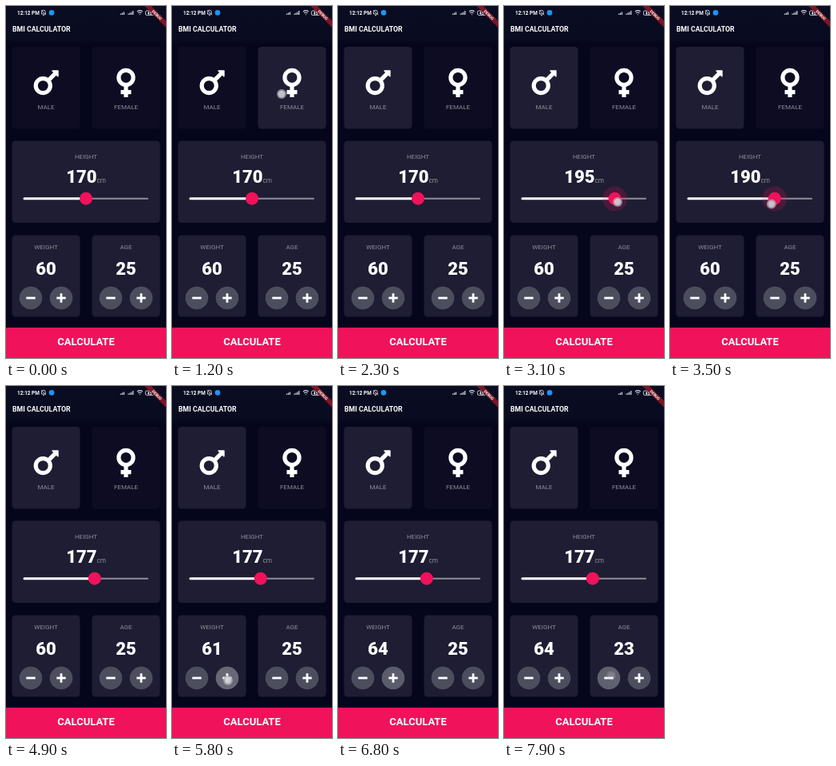
Animation, 200 px wide and 440 px high, one loop 8000 ms. Source, as an HTML page:

```html
<!DOCTYPE html>
<html lang="en">
<head>
<meta charset="utf-8">
<title>BMI Calculator</title>
<style>
html, body { margin: 0; width: 200px; height: 440px; overflow: hidden; background: #05061c; }
svg { display: block; font-family: Roboto, "Liberation Sans", sans-serif; }
.card { fill: #1e1d33; }
.label { font-size: 8px; fill: #8d8e98; text-anchor: middle; }
.num { font-size: 22px; font-weight: 900; fill: #fff; text-anchor: middle; }
.unit { font-size: 8.2px; font-weight: 400; fill: #8d8e98; }
.bold { font-weight: 700; fill: #fff; }
</style>
</head>
<body>
<svg width="200" height="440" viewBox="0 0 200 440">
  <defs>
    <linearGradient id="bar" x2="0" y2="1">
      <stop offset="0" stop-color="#0a0d22"/>
      <stop offset=".85" stop-color="#090b20"/>
      <stop offset="1" stop-color="#05061c"/>
    </linearGradient>
    <g id="button">
      <circle r="14.3" fill="#4c4e5e"/>
      <path d="M-5.7 0H5.7" stroke="#fff" stroke-width="2.8"/>
    </g>
  </defs>
  <rect width="200" height="48" fill="url(#bar)"/>

  <!-- status bar -->
  <text class="bold" x="14" y="10.8" font-size="6.4">12:12 PM</text>
  <g fill="none" stroke="#d5d6de" stroke-width=".9">
    <path d="M44.5 10V7.6a2.4 2.4 0 0 1 4.8 0V10ZM46 11.6h2M44 5.2l6 6"/>
    <path d="M164 7q3.3-2.6 6.6 0M165.2 8.8q2.1-1.6 4.2 0" stroke-width="1.2"/>
    <rect x="174.4" y="6" width="10.4" height="5.4" rx="1.4"/>
  </g>
  <circle cx="57" cy="8.4" r="3.3" fill="#1c96f3"/>
  <path d="M143 11v-1.5h1.2V11zm1.9 0V8.6h1.2V11zm1.9 0V7.4H148V11zM152.500 11v-1.500h1.200V11zm1.900 0V8.600h1.200V11zm1.900 0V7.400h1.200V11zm1.900 0V6h1.200v5zM166.400 10.300h1.800l-.9 1.200z" fill="#d5d6de"/>
  <text class="bold" x="179.600" y="10.500" font-size="4.800" text-anchor="middle">45</text>
  <g transform="translate(200) rotate(45)">
    <rect x="-22" y="13" width="44" height="6" fill="#7d1524"/>
    <text class="bold" y="17.700" font-size="4.800" text-anchor="middle">DEBUG</text>
  </g>
  <text class="bold" x="8" y="32" font-size="8.750">BMI CALCULATOR</text>

  <!-- gender -->
  <rect id="male" class="card" x="7.500" y="51" width="85" height="102.500" rx="4.400"/>
  <rect id="female" class="card" x="107.500" y="51" width="85" height="102.500" rx="4.400"/>
  <g transform="translate(34.600 75) scale(.081)" fill="none" stroke="#fff" stroke-width="64">
    <circle cx="144" cy="304" r="112"/>
    <path d="M225 223L335 113"/>
    <path d="M290 74H374V158Z" fill="#fff" stroke-width="20" stroke-linejoin="round"/>
  </g>
  <g transform="translate(138.300 75.200) scale(.081)" fill="none" stroke="#fff" stroke-width="64">
    <circle cx="144" cy="176" r="112"/>
    <path d="M144 300V480M64 400H224"/>
  </g>
  <text class="label" x="50" y="128.900">MALE</text>
  <text class="label" x="150" y="128.900">FEMALE</text>

  <!-- height -->
  <rect class="card" x="7.500" y="168.500" width="185" height="102.500" rx="4.400"/>
  <text class="label" x="100" y="190.900">HEIGHT</text>
  <text class="num" x="100" y="221"><tspan id="height">170</tspan><tspan class="unit">cm</tspan></text>
  <path d="M23 240.700H177" stroke="#8d8e98" stroke-width="2" stroke-linecap="round"/>
  <path id="track" stroke="#fff" stroke-width="3" stroke-linecap="round"/>
  <circle id="halo" cy="240.700" fill="#eb1555" opacity=".2"/>
  <circle id="knob" cy="240.700" r="8" fill="#f0125a"/>

  <!-- weight and age -->
  <rect class="card" x="7.500" y="286.500" width="85" height="102" rx="4.400"/>
  <rect class="card" x="107.500" y="286.500" width="85" height="102" rx="4.400"/>
  <text class="label" x="50" y="303.800">WEIGHT</text>
  <text class="label" x="150" y="303.800">AGE</text>
  <text class="num" id="weight" x="50" y="336">60</text>
  <text class="num" id="age" x="150" y="336">25</text>
  <use href="#button" x="31" y="365"/>
  <use href="#button" x="69" y="365"/>
  <use href="#button" x="131" y="365"/>
  <use href="#button" x="169" y="365"/>
  <path d="M69 359.300v11.400M169 359.300v11.400" stroke="#fff" stroke-width="2.800"/>
  <circle id="weightGlow" cx="69" cy="365" r="14.300" fill="#fff"/>
  <circle id="ageGlow" cx="131" cy="365" r="14.300" fill="#fff"/>

  <rect y="402" width="200" height="38" fill="#f0125a"/>
  <text class="bold" x="100" y="424.200" font-size="13" text-anchor="middle">CALCULATE</text>

  <g id="touch">
    <circle r="6" fill="#aaa9b2" opacity=".75"/>
    <circle r="4.200" fill="#e2e1e6" opacity=".65"/>
  </g>
</svg>
<script>
const LOOP = 8000;
const $ = id => document.getElementById(id);
const clamp = v => Math.max(0, Math.min(1, v));

// press and release times, with the finger's place
const tap = (down, up, x, y) => ({ down, up, x, y });
const femaleTap = tap(1050, 1180, 137, 110);
const maleTap = tap(1780, 1900, 52, 108);
const drag = tap(2450, 4500);
const weightTaps = [5780, 6080, 6380, 6690].map(up => tap(up - 120, up, 70, 368));
const ageTaps = [7430, 7820].map(up => tap(up - 130, up, 134, 362));
const taps = [femaleTap, maleTap, drag, ...weightTaps, ...ageTaps];

const heightKeys = [[2550, 170], [3100, 195], [3320, 200], [3850, 172], [4100, 176], [4250, 177]];
const fingerKeys = [[2450, 243], [3100, 245], [4100, 251.5]];

function along(keys, t) {
  if (t <= keys[0][0]) return keys[0][1];
  for (let i = 1; i < keys.length; i++) {
    const [a, from] = keys[i - 1], [b, to] = keys[i];
    if (t < b) return from + (to - from) * (t - a) / (b - a);
  }
  return keys[keys.length - 1][1];
}

const sliderX = cm => 23 + (cm - 120) * 1.54;
const count = (list, t) => list.filter(p => t >= p.up).length;
const touchAlpha = (p, t) => clamp(Math.min((t - p.down) / 50, 1 - (t - p.up - 40) / 60));
const glow = (list, t) => .16 * Math.max(...list.map(p =>
  clamp(Math.min((t - p.down) / 80, 1 - (t - p.up) / 260))));

function draw(t) {
  const shade = on => on ? "#1e1d33" : "#0d0c22";
  $("male").style.fill = shade(t >= maleTap.up);
  $("female").style.fill = shade(t >= femaleTap.up && t < maleTap.up);

  const cm = Math.round(along(heightKeys, t)), x = sliderX(cm);
  $("height").textContent = cm;
  $("track").setAttribute("d", `M23 240.7H${x}`);
  $("knob").setAttribute("cx", x);
  $("halo").setAttribute("cx", x);
  $("halo").setAttribute("r", 15.5 * clamp(Math.min((t - drag.down) / 100, 1 - (t - drag.up) / 100)));

  $("weight").textContent = 60 + count(weightTaps, t);
  $("age").textContent = 25 - count(ageTaps, t);
  $("weightGlow").setAttribute("opacity", glow(weightTaps, t));
  $("ageGlow").setAttribute("opacity", glow(ageTaps, t));

  const p = taps.find(p => touchAlpha(p, t) > 0);
  $("touch").setAttribute("opacity", p ? touchAlpha(p, t) : 0);
  if (p) {
    // the knob trails a little behind the finger
    const fx = p.x ?? sliderX(along(heightKeys, t + 70)) + 1;
    const fy = p.y ?? along(fingerKeys, t);
    $("touch").setAttribute("transform", `translate(${fx} ${fy})`);
  }
}

const start = performance.now();
function tick() {
  draw((performance.now() - start) % LOOP);
  requestAnimationFrame(tick);
}
tick();
</script>
</body>
</html>
```
